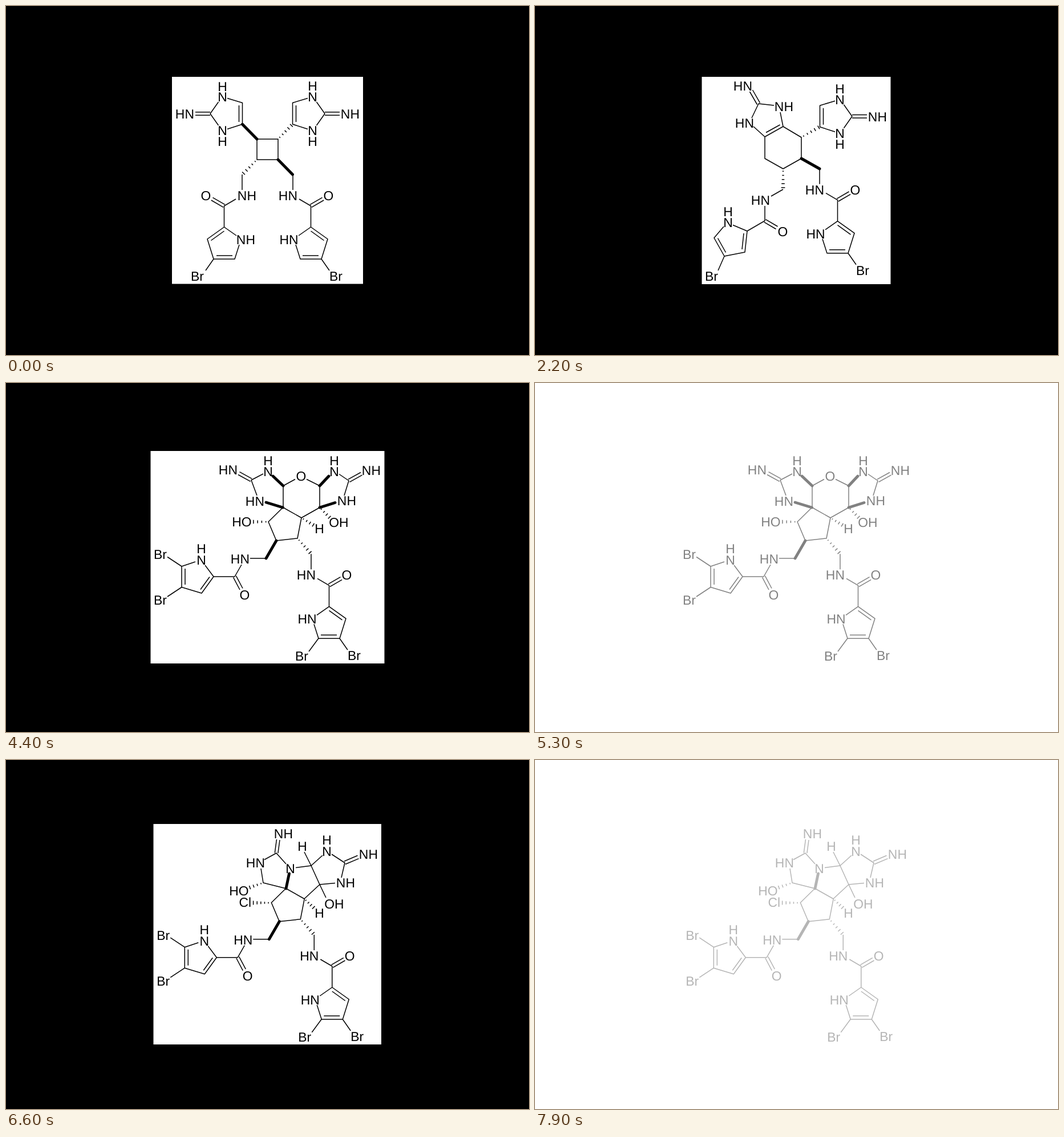
Write an HTML page that moves like this. It is 917x611 px and loops after 8 s.

```html
<!DOCTYPE html>
<html>
<head>
<meta charset="utf-8">
<style>
  html, body { margin: 0; height: 100%; overflow: hidden; background: #000; }
  svg { display: block; width: 917px; height: 611px; }
  path { fill: none; stroke: #000; stroke-width: 1.5; stroke-linejoin: round; }
  .bold { stroke-width: 4.9; stroke-linecap: round; }
  text {
    font: 22.9px "Liberation Sans", Arial, sans-serif;
    text-anchor: middle;
    text-rendering: geometricPrecision;
  }
</style>
</head>
<body>
<svg viewBox="0 0 917 611">
  <rect id="stage" width="917" height="611"/>
  <rect id="card" fill="#fff"/>
  <g id="ink"></g>
</svg>
<script>
const thin = d => `<path d="${d}"/>`;
const bold = d => `<path class="bold" d="${d}"/>`;
const shift = (x, y, body) => `<g transform="translate(${x} ${y})">${body}</g>`;
const mirror = body => `<g transform="matrix(-1 0 0 1 917 0)">${body}</g>`;

// labels: "text x y; text x y", each centred on its point
const labels = list => list.split(';').map(item => {
  const [s, x, y] = item.trim().split(' ');
  return `<text x="${+x + .4}" y="${+y + 8.2}">${s}</text>`;
}).join('');

// hashed wedge, widening from the first point to the second
function hash(x1, y1, x2, y2) {
  const dx = x2 - x1, dy = y2 - y1, len = Math.hypot(dx, dy);
  const count = Math.round(len / 7);
  let d = '';
  for (let i = 0; i < count; i++) {
    const k = (i + .6) / count, w = (.8 + 2.8 * k) / len;
    const x = x1 + dx * k, y = y1 + dy * k;
    d += `M${x - dy * w},${y + dx * w}L${x + dy * w},${y - dx * w}`;
  }
  return thin(d);
}

const armBonds = thin(`M503,295V322M514,338L534.5,350V387
  M533.2,347.6L554.5,335.3M535.9,352.3L557.2,340
  M513,402L534.5,387L564,408L553,443H516L508,418
  M534.5,394L557.5,410.5M548,437H520M553,443L567,463`);
const arm = armBonds + labels('HN 494 332; O 565 332; HN 495.6 409; Br 578 473');

const ringBonds = thin(`M529,161.5L502.5,169.5V207L529,215.5
  M544.5,168L559,188.5L544.5,209M508.5,174V203
  M559,185.7H585M559,191.3H585`);
const ring = ringBonds + labels('N 537 159; H 537 140; N 537 218; H 537 237; NH 603 189');

// cyclopentane with both dibromopyrrole arms
const lower = thin(`M485.5,218L460,243L474,276L511,272L518,236
    M456,307H428M413,318L401,339H364
    M403.4,337.7L415,359.5M398.6,340.3L410,362
    M364,339L349,319M332,313L308,321V357.5L343,368L364,339
    M357,339.5L341,361.5M314,325V353
    M308,321L283,304.5M308,357.5L283,374M548,447L531,470`)
  + bold('M474,276L456,307') + hash(511, 272, 535, 299)
  + labels('HN 410 308; O 418 371; N 342 310; H 342 290; Br 270 300; Br 270 380; Br 518 478')
  + shift(32, 4.3, arm);

const molecules = [
  { card: [291, 124, 335, 362.5],
    body: thin('M440,233H477V269H440Z')
      + bold('M414.5,207L440,233M477,269L502.5,295')
      + hash(440, 269, 414.5, 295) + hash(477, 233, 502.5, 207)
      + ring + arm + mirror(ringBonds + armBonds)
      + labels(`N 379 159; H 379 141; N 379 218; H 379 237; HN 313 189;
        NH 422 332; O 350 332; NH 420 409; Br 335 473`) },

  { card: [292.5, 124, 331, 363],
    body: thin(`M389.5,172.5L376.5,150M394.5,169.6L381.5,147
        M419,174L392,171L380,196M430,186L435,211L403,229L383,211M405,221.5L429.5,208
        M435,211L467,230V267L435,285L403,267V229
        M435,321L414,333M403,350V376L372,394
        M401.7,378.4L422.5,390.5M404.4,373.6L425.5,386
        M347,383.5L372,394L368,431L332,438L314,406L331,386
        M366,398L363,426M320.5,406.5L334.5,431.5M332,438L321,463`)
      + bold('M467,267L499,285')
      + hash(467, 230, 500, 211) + hash(435, 285, 435, 321)
      + labels(`HN 364 140; NH 436 176; HN 367 205; HN 395 340; O 434 395;
        N 338 379; H 338 360; Br 309 473`)
      + shift(-3, 4.7, ring) + shift(-4, -10.3, arm) },

  { card: [253.5, 119, 410, 372],
    body: thin(`M407,160.5L428.7,172.4M409.5,155.6L431.3,167.6
        M451,159L430,170L440,197
        M507,168.5L486,180V218L518,236L550,218V180L527,168.5
        M600,168.6L622,156.5M602.5,173.3L624.5,161.2M584,159.5L601,171L593,197`)
      + bold('M486,180L468,163M485.5,218L456,209M550,180L566,163M550,218L577,209.5')
      + hash(460, 243, 431, 243) + hash(518, 236, 541, 250) + hash(550, 218, 569, 237)
      + labels(`HN 389 152; N 459 155; H 459 136; HN 436 207; O 517 163;
        N 575 155; H 575 136; NH 640 153; NH 597 206; HO 413 243; H 549 255; OH 583 244`)
      + lower },

  { card: [258.5, 112, 399.5, 386],
    body: thin(`M471.3,162.6L474.5,139M476.9,163.2L480,140
        M491,182L474,163L453,174.5M447,190L451,215L491,225L523,243L550,218L535,185L508,188.5
        M535,185L523,161M535,185L555,167M571,165L594,180L588,206
        M593,177.2L616.5,167.3M595,182.5L618.5,172.6M550,218L577,215.5M550,218L561,241`)
      + bold('M491,225L496.5,199')
      + hash(451, 215, 425, 224) + hash(464, 250, 431, 250) + hash(523, 243, 541, 260)
      + labels(`NH 486 129; HN 437 180; N 498 190; H 519 151; N 562 160; H 562 140;
        NH 635 165; NH 595 215; OH 575 252; H 549 268; HO 408 229; Cl 419 249`)
      + shift(5.3, 6.7, lower) }
];

const STEP = 100, STEPS = 22, LOOP = 8000;
const [stage, card, ink] = ['stage', 'card', 'ink'].map(id => document.getElementById(id));
let shown = -1;

function draw(now) {
  const tick = Math.floor((now % LOOP) / STEP);
  const index = Math.floor(tick / STEPS), step = tick % STEPS;
  if (index !== shown) {
    shown = index;
    const m = molecules[index];
    ink.innerHTML = m.body;
    ['x', 'y', 'width', 'height'].forEach((name, i) => card.setAttribute(name, m.card[i]));
  }
  // one black step, then a fade out on white
  stage.setAttribute('fill', step ? '#fff' : '#000');
  ink.setAttribute('opacity', (1 - step / (STEPS - 1)) ** 1.28);
}

const start = performance.now();
function loop() {
  draw(performance.now() - start);
  requestAnimationFrame(loop);
}
loop();
</script>
</body>
</html>
```
